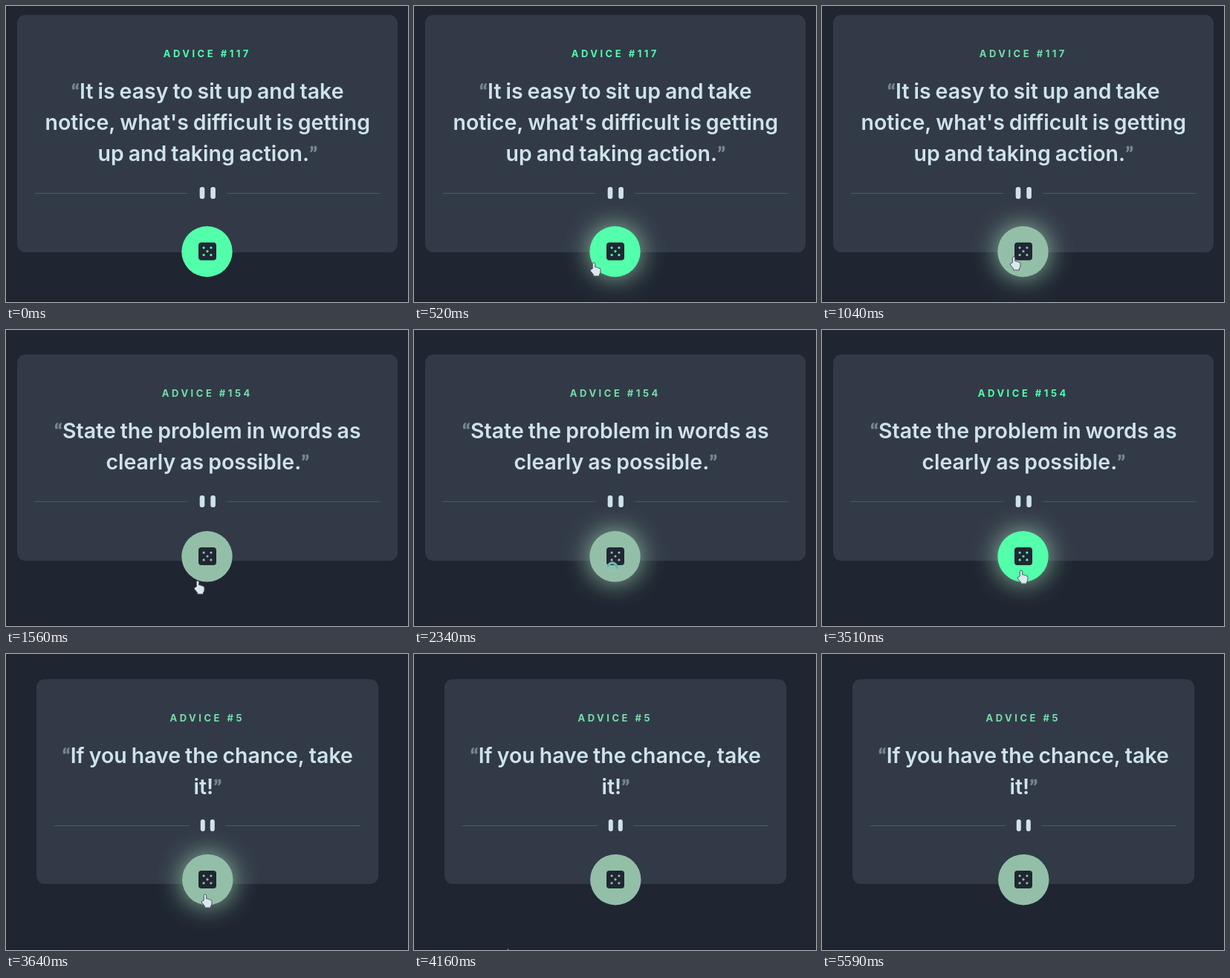
An HTML page with a canvas for the animation above (5.72 s loop, 541 by 399 pixels).

```html
<!DOCTYPE html>
<html lang="en">
<head>
<meta charset="utf-8">
<title>Advice card</title>
<style>
  html, body { margin: 0; width: 100%; height: 100%; overflow: hidden; background: #1f2631; }
  canvas { display: block; }
</style>
</head>
<body>
<canvas id="stage" width="541" height="399"></canvas>
<script>
const ctx = document.getElementById('stage').getContext('2d');
const LOOP = 5720, STEP = 130;
const BG = '#1f2631', CARD = '#323a47', TEXT = '#cee3e9', MUTED = '#74858f';
const GREEN = '#53ffaa', SOFT = '#74dfa9', DULL = '#93bfa8', RULE = '#495c6d', DARK = '#202733';
const SANS = 'Inter, "Open Sans", sans-serif';
const BODY_FONT = `600 28.5px ${SANS}`;
const TITLE_FONT = `700 13px ${SANS}`;
const QUOTE_FONT = '900 27px Lato, sans-serif';

// Each card holds from its start time until the next one.
const cards = [
  { start: 0, x: 15, y: 12, w: 512, h: 320, title: 'ADVICE #117', titleY: 69, textY: 125,
    lines: ['“It is easy to sit up and take', "notice, what's difficult is getting", 'up and taking action.”'],
    ruleY: 252, gap: 27, bars: 6.6, barOff: 7.3, bx: 270.5, by: 331 },
  { start: 1560, x: 15, y: 33, w: 512, h: 278, title: 'ADVICE #154', titleY: 90, textY: 146,
    lines: ['“State the problem in words as', 'clearly as possible.”'],
    ruleY: 231, gap: 27, bars: 6.6, barOff: 7.3, bx: 270.5, by: 305.3 },
  { start: 3640, x: 41, y: 34, w: 460, h: 276, title: 'ADVICE #5', titleY: 90.5, textY: 147,
    lines: ['“If you have the chance, take', 'it!”'],
    ruleY: 231, gap: 24.5, bars: 6, barOff: 6.5, bx: 271.3, by: 304.2 }
];

// Pointer waypoints: time, x, y
const path = [
  [130, 152, 394], [390, 226, 354], [650, 258, 338], [1820, 258, 338],
  [2080, 268, 324], [3770, 268, 324], [3900, 250, 341], [4160, 126, 397]
];

const hand = new Path2D('M-1.7 8V1.4Q-1.5 0 0 0Q1.6 0 1.7 1.4V6Q3 5 4.2 6.6Q5.5 5.8 6.6 7.4Q9 7 9 9.4V12Q9 14.5 7.4 16V18H-.4V16.2L-4.6 11Q-5.2 9 -3.4 9Z');
const arrow = new Path2D('M0 0V15L3.5 11.8L5.8 17L8.2 16L6 11H10.7Z');

function pointerAt(t) {
  if (t < path[0][0] || t > path[path.length - 1][0]) return null;
  const i = Math.max(1, path.findIndex(p => p[0] >= t));
  const [t0, x0, y0] = path[i - 1], [t1, x1, y1] = path[i];
  const k = (t - t0) / (t1 - t0);
  return { x: x0 + (x1 - x0) * k, y: y0 + (y1 - y0) * k };
}

function box(x, y, w, h, r, fill) {
  ctx.fillStyle = fill;
  ctx.beginPath();
  ctx.roundRect(x, y, w, h, r);
  ctx.fill();
}

function disc(x, y, r, fill) {
  ctx.fillStyle = fill;
  ctx.beginPath();
  ctx.arc(x, y, r, 0, Math.PI * 2);
  ctx.fill();
}

// Centres a line whose quote marks have their own font and colour.
function centred(text, cx, y) {
  const parts = text.split(/([“”])/).filter(Boolean).map(str => {
    const quote = /[“”]/.test(str);
    const font = ctx.font = quote ? QUOTE_FONT : BODY_FONT;
    return { str, font, fill: quote ? MUTED : TEXT, width: ctx.measureText(str).width };
  });
  let x = cx - parts.reduce((sum, p) => sum + p.width, 0) / 2;
  for (const p of parts) {
    ctx.font = p.font;
    ctx.fillStyle = p.fill;
    ctx.fillText(p.str, x, y);
    x += p.width;
  }
}

function drawCard(c, titleFill) {
  box(c.x, c.y, c.w, c.h, 11, CARD);
  const cx = c.x + c.w / 2 + 0.3;

  ctx.font = TITLE_FONT;
  ctx.letterSpacing = '3.5px';
  ctx.wordSpacing = '0px';
  ctx.fillStyle = titleFill;
  ctx.fillText(c.title, 270.8 - ctx.measureText(c.title).width / 2, c.titleY);

  ctx.letterSpacing = '0px';
  ctx.wordSpacing = '-1.2px';
  c.lines.forEach((line, i) => centred(line, cx, c.textY + i * 42));

  const ruleW = c.w / 2 - 24 - c.gap;
  ctx.fillStyle = RULE;
  ctx.fillRect(c.x + 24, c.ruleY, ruleW, 1);
  ctx.fillRect(c.x + c.w - 24 - ruleW, c.ruleY, ruleW, 1);
  for (const side of [-1, 1]) {
    box(cx + side * c.barOff - c.bars / 2, c.ruleY - 8, c.bars, 16, 3, TEXT);
  }
}

function drawButton(c, fill, glow) {
  ctx.save();
  if (glow) {
    ctx.shadowColor = DULL;
    ctx.shadowBlur = 34;
  }
  disc(c.bx, c.by, 34.2, fill);
  ctx.restore();
  const dx = 271, dy = c.by - 0.3;
  box(dx - 12, dy - 12, 24, 24, 4, DARK);
  for (const [x, y] of [[0, 0], [-1, -1], [1, -1], [-1, 1], [1, 1]]) {
    disc(dx + x * 4.9, dy + y * 4.9, 1.6, fill);
  }
}

function drawPointer(p, over) {
  ctx.save();
  ctx.translate(p.x, p.y);
  const shape = over ? hand : arrow;
  ctx.fillStyle = '#dde8ee';
  ctx.strokeStyle = '#4a5661';
  ctx.lineWidth = 1;
  ctx.fill(shape);
  ctx.stroke(shape);
  ctx.restore();
}

function drawSpinner(x, y) {
  ctx.lineWidth = 3;
  ctx.strokeStyle = '#8fc4b4';
  ctx.beginPath();
  ctx.arc(x, y, 6, 0, Math.PI * 2);
  ctx.stroke();
  ctx.strokeStyle = '#68b5ad';
  ctx.beginPath();
  ctx.arc(x, y, 6, Math.PI, Math.PI * 2.1);
  ctx.stroke();
}

function draw(now) {
  const t = Math.floor((now % LOOP) / STEP) * STEP;
  const card = cards.filter(c => c.start <= t).pop();
  const p = pointerAt(t);
  const over = p && Math.hypot(p.x - card.bx, p.y - card.by) < 34;
  const bright = t < 910 || (t >= 2990 && t < 3640);
  const resting = t >= 1560 && t < 1950;

  ctx.fillStyle = BG;
  ctx.fillRect(0, 0, 541, 399);
  ctx.fillStyle = '#1a202a';
  ctx.fillRect(0, 398, 541, 1);
  drawCard(card, bright ? GREEN : SOFT);
  drawButton(card, bright ? GREEN : DULL, over && !resting);
  if (t >= 2340 && t < 2990) drawSpinner(267, 320);
  else if (p) drawPointer(p, over || resting);
}

const begin = performance.now();
function tick() {
  draw(performance.now() - begin);
  requestAnimationFrame(tick);
}
tick();
</script>
</body>
</html>
```
